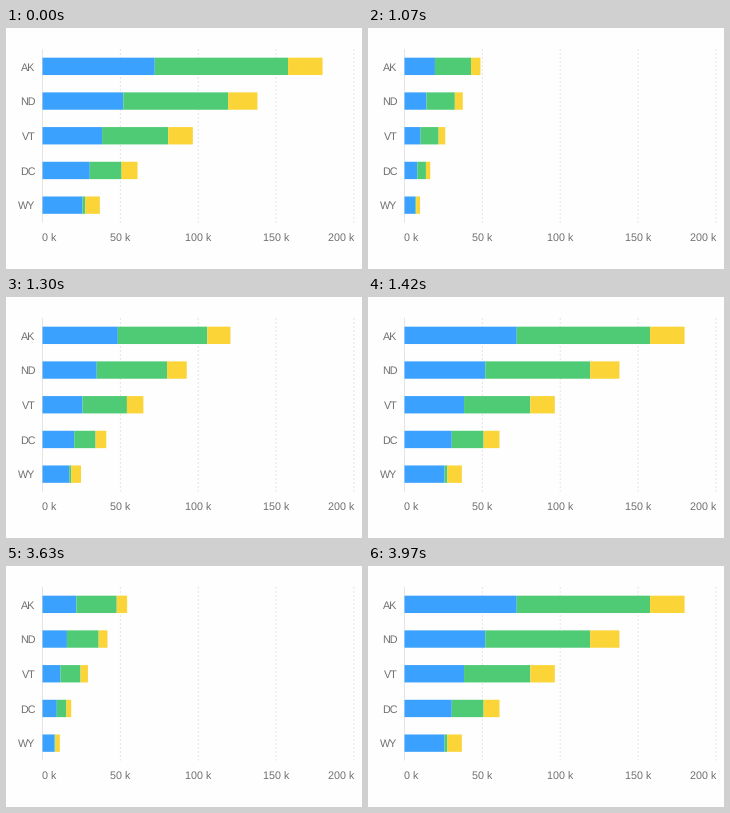
Animation, 356 px wide and 241 px high, one loop 5.39 s. Source, as a matplotlib script:

```python
import numpy as np
import matplotlib.pyplot as plt
from matplotlib.animation import FuncAnimation
from matplotlib.patches import Rectangle

plt.rcParams["font.family"] = "Liberation Sans"
plt.rcParams["text.hinting"] = "none"

W, H, DPI = 356, 241, 64
LOOP_MS, STEP_MS = 5390, 10
PT = 72 / DPI

LEFT, RIGHT, TOP, BOTTOM = 36.5, 347.9, 21, 194.5
PX_PER_K = (RIGHT - LEFT) / 200
ROW = (BOTTOM - TOP) / 5
COLORS = ["#3ba1ff", "#4ecb74", "#fbd437"]
TEXT, GRID = "#707070", "#e4e4e4"

DATA = {
    "AK": (72.083, 85.640, 22.153),
    "ND": (51.896, 67.358, 18.794),
    "VT": (38.253, 42.538, 15.757),
    "DC": (30.352, 20.439, 10.225),
    "WY": (25.635, 1.890, 9.314),
}

# Each run: moment the chart is cleared, start of growth, then redraw times.
RUNS = [
    (890, 948, [950, 1010, 1070, 1130, 1190, 1250, 1310, 1360, 1420]),
    (3400, 3484, [3510, 3570, 3620, 3680, 3740, 3800, 3860, 3920, 3970]),
]
GROW_MS = 450

fig = plt.figure(figsize=(W / DPI, H / DPI), dpi=DPI, facecolor="#fefefe")
ax = fig.add_axes([0, 0, 1, 1])
ax.set_xlim(0, W)
ax.set_ylim(H, 0)
ax.axis("off")


def label(x, y, text, align):
    ax.text(x, y, text, ha=align, va="baseline", color=TEXT, fontsize=10.7 * PT)


def vline(x, style):
    ax.plot([x, x], [TOP, BOTTOM], color=GRID, lw=PT, ls=style,
            snap=False, dash_capstyle="butt", solid_capstyle="butt", zorder=1)


for k in range(0, 201, 50):
    x = LEFT + k * PX_PER_K
    vline(x, (0, (2, 2)) if k else "-")
    label(x, 213.4, f"{k} k", {0: "left", 200: "right"}.get(k, "center"))

bars = []
for row, (state, values) in enumerate(DATA.items()):
    mid = TOP + ROW * (row + 0.5)
    label(29.5, mid + 4.2, state, "right")
    start = 0
    for value, color in zip(values, COLORS):
        bar = Rectangle((LEFT, mid - ROW / 4), 0, ROW / 2,
                        fc=color, lw=0, snap=False, zorder=2)
        ax.add_patch(bar)
        bars.append((bar, start * PX_PER_K, value * PX_PER_K))
        start += value


def growth(ms):
    """Bar scale at a time, or None while the chart is cleared."""
    for cleared, begin, redraws in reversed(RUNS):
        if ms >= cleared:
            i = np.searchsorted(redraws, ms, side="right") - 1
            return None if i < 0 else min(1, (redraws[i] - begin) / GROW_MS)
    return 1


def update(frame):
    scale = growth(frame * STEP_MS)
    ax.set_visible(scale is not None)
    for bar, start, width in bars:
        bar.set_x(LEFT + start * (scale or 0))
        bar.set_width(width * (scale or 0))
    return [bar for bar, _, _ in bars]


anim = FuncAnimation(fig, update, frames=LOOP_MS // STEP_MS, interval=STEP_MS,
                     repeat=True, repeat_delay=0, blit=False)
plt.show()
```
